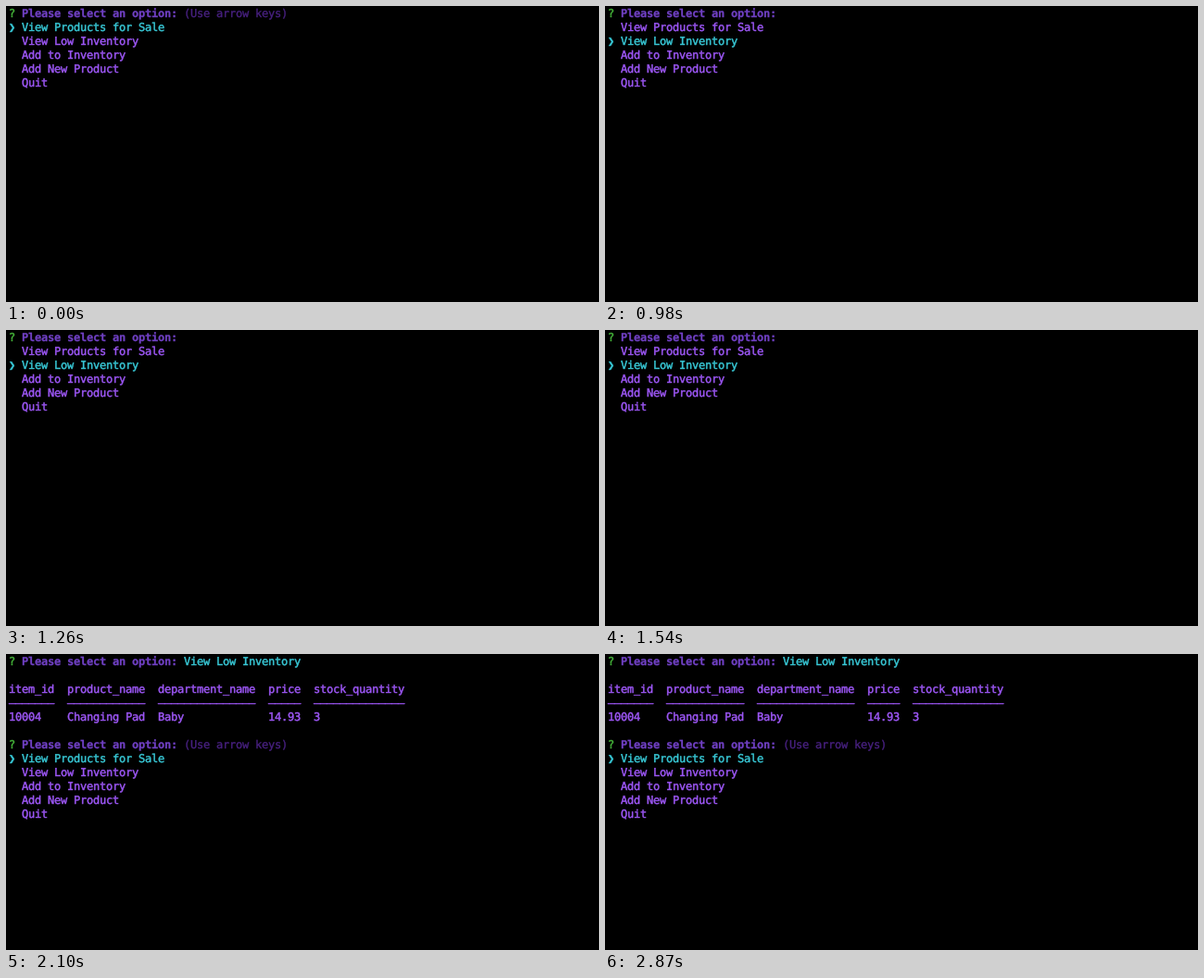
These frames come from a looping animation (640x320 px, 2.94 s). An HTML page:

```html
<!DOCTYPE html>
<html lang="en">
<head>
<meta charset="utf-8">
<title>Inventory menu</title>
<style>
  html, body { margin: 0; width: 100%; height: 100%; overflow: hidden; background: #000; }
  svg { display: block; width: 640px; height: 320px; }
  text {
    font: 12px "DejaVu Sans Mono", monospace;
    letter-spacing: -0.2246px; /* 7px columns */
    white-space: pre;
    text-rendering: geometricPrecision;
    fill: #9d57f6;
    stroke: #9d57f6;
    stroke-width: .45px;
  }
  .cyan { fill: #38c8d6; stroke: #38c8d6; }
  .green { fill: #45b53a; stroke: #45b53a; }
  .bold { fill: #7040c4; stroke: #7040c4; stroke-width: .25px; font-weight: bold; }
  .dim { fill: #47207f; stroke: #47207f; stroke-width: .35px; }

  .scene { visibility: hidden; animation: 2940ms step-end infinite; }
  .start { animation-name: start; }
  .moved { animation-name: moved; }
  .result { animation-name: result; }
  @keyframes start { 0% { visibility: visible } 26.19%, 100% { visibility: hidden } }
  @keyframes moved { 0% { visibility: hidden } 26.19% { visibility: visible } 54.76%, 100% { visibility: hidden } }
  @keyframes result { 0% { visibility: hidden } 54.76%, 100% { visibility: visible } }
</style>
</head>
<body>
<svg viewBox="0 0 640 320">
  <defs>
    <g id="prompt">
      <text class="green" x="3" y="12">?</text>
      <text class="bold" x="17" y="12">Please select an option:</text>
    </g>
    <g id="rest">
      <text x="17" y="57">Add to Inventory</text>
      <text x="17" y="72">Add New Product</text>
      <text x="17" y="87">Quit</text>
    </g>
    <g id="menu">
      <use href="#prompt"/>
      <text class="dim" x="192" y="12">(Use arrow keys)</text>
      <text class="cyan" x="3" y="27">❯</text>
      <text class="cyan" x="17" y="27">View Products for Sale</text>
      <text x="17" y="42">View Low Inventory</text>
      <use href="#rest"/>
    </g>
  </defs>

  <g class="scene start"><use href="#menu"/></g>

  <g class="scene moved">
    <use href="#prompt"/>
    <text x="17" y="27">View Products for Sale</text>
    <text class="cyan" x="3" y="42">❯</text>
    <text class="cyan" x="17" y="42">View Low Inventory</text>
    <use href="#rest"/>
  </g>

  <g class="scene result">
    <use href="#prompt"/>
    <text class="cyan" x="192" y="12">View Low Inventory</text>
    <text x="3" y="42">item_id  product_name  department_name  price  stock_quantity</text>
    <text x="3" y="57">———————  ————————————  ———————————————  —————  ——————————————</text>
    <text x="3" y="72">10004    Changing Pad  Baby             14.93  3</text>
    <use href="#menu" y="90"/>
  </g>
</svg>
</body>
</html>
```
